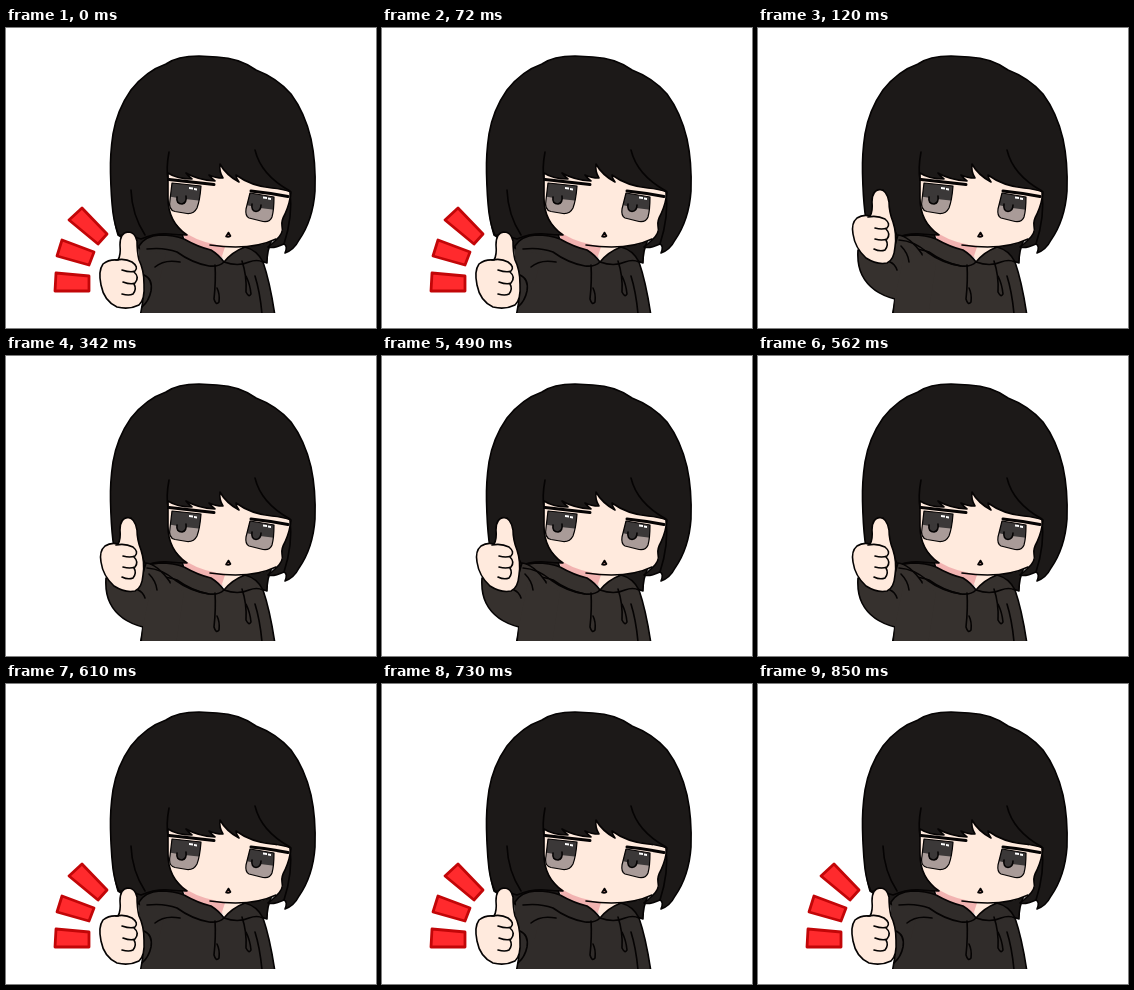
An HTML page for the animation above (970 ms loop, 370 by 300 pixels).

```html
<!DOCTYPE html>
<html lang="en">
<head>
<meta charset="utf-8">
<title>Thumbs up</title>
<style>
  html, body { margin: 0; width: 100%; height: 100%; overflow: hidden; background: #fff; }
  svg { display: block; width: 100vw; height: 100vh; }
  .ink { fill: none; stroke: #050303; stroke-width: 1.6; stroke-linecap: round; stroke-linejoin: round; }
  .hair { fill: #1c1918; }
  .skin { fill: #ffeadd; }
  .blush { fill: #f2b3b1; }
  .cloth { fill: var(--cloth); }
  .iris { fill: #a99b98; }
  .shade { fill: #3b3838; }
  .lid { stroke-width: 3; }
  .marks path { fill: #ff2a2d; stroke: #c20608; stroke-width: 2.8; stroke-linejoin: round; }

  svg { --cloth: #302c2a; animation: cloth 970ms step-end infinite; }
  .push { animation: push 970ms step-end infinite; }
  .raise { animation: raise 970ms step-end infinite; }
  /* raised from 120 ms to 610 ms */
  @keyframes cloth { 0%, 62.887% { --cloth: #302c2a; } 12.371% { --cloth: #36312e; } }
  @keyframes push { 0%, 62.887% { visibility: visible; } 12.371% { visibility: hidden; } }
  @keyframes raise { 0%, 62.887% { visibility: hidden; } 12.371% { visibility: visible; } }
</style>
</head>
<body>
<svg viewBox="0 0 370 300" preserveAspectRatio="none">
  <defs>
    <clipPath id="left-iris"><path id="left-eye" d="M166 155 L195 158 Q194 172 191 180 Q188 186 181 185.500 L169 183.500 Q162 182 164 172Z"/></clipPath>
    <clipPath id="right-iris"><path id="right-eye" d="M244 165 L268 169 Q268 182 266 189 Q264 194.500 257 193.500 L243 190 Q239 188 240 181Z"/></clipPath>
    <clipPath id="crop"><path d="M0 0H370V285H0Z"/></clipPath>
  </defs>

  <g clip-path="url(#crop)">
    <!-- back hair -->
    <path class="ink hair" d="M107 150 Q106 188 112 207 L136 222 L178 214 L165 150Z"/>
    <path class="ink hair" d="M236 218 L266 212 Q261 222 261 235 Q252 232 244 229Z"/>

    <!-- neck -->
    <path class="blush" d="M174 198 L226 214 L217 230 L206 223 L180 214Z"/>
    <path class="skin" d="M220 216 L240 216 L219 234 L216 228Z"/>

    <!-- hoodie -->
    <path class="ink cloth" d="M133 218 Q139 208 154 207 Q168 207 178 211 Q192 219 205 222 Q213 227 218 234 Q226 224 239 219 Q251 222 257 234 Q264 254 269 288 H134 Q139 270 136 246Z"/>
    <path class="ink" d="M141 221 Q158 219 171 224 Q186 235 203 238 Q213 239 218 234 M218 234 Q232 239 243 234 Q251 231 257 234"/>
    <path class="ink" d="M249 248 Q254 264 256 286"/>
    <path class="ink" d="M209 237 Q210 252 208 271 Q210 278 213 274 Q214 266 211 260 M236 233 Q241 248 240 264 Q243 270 245 266 Q244 256 240 248"/>

    <!-- face -->
    <path class="skin" d="M162 120 L162 180 Q167 197 181 206 Q198 216 220 218 Q246 221 266 213 L280 204 L287 160 L230 115Z"/>
    <path class="ink" d="M204 217 Q245 223 270 211"/>

    <!-- front hair with the fringe -->
    <path class="ink hair" d="M193 28 Q171 28 160 36 Q140 43 125 62 Q111 82 107 106 Q104 126 104.500 145 Q105 168 107 185 Q109 199 113 207 Q123 207 135 211 Q149 205 163 206 Q173 207 181 207
      Q162 194 162 170 L162 145 Q171 151 186 151 Q182 148 180 145 Q192 152 209 153 Q205 150 203 147 Q209 150 217 150 Q213 144 214 136
      Q220 147 233 154 Q230 150 230 147 Q245 158 266 160 Q277 161 285 164 Q284 175 279 186 Q275 193 276 198 Q278 205 270 212 Q266 216 262 219
      Q267 221 278 216 Q282 218 279 225 Q288 222 293 212
      Q307 192 309 163 Q310 134 305 111 Q299 85 285 66 Q271 50 250 42 Q234 30 211 29Z"/>
    <path class="ink" d="M125 162 Q126 187 139 207 M163 124 Q160 140 162 152 M249 122 Q255 147 284 163 M284 164 Q287 188 278 216"/>

    <!-- eyes -->
    <use href="#left-eye" class="iris"/>
    <g clip-path="url(#left-iris)">
      <path class="shade" d="M160 150H200V173Q179 172 160 168Z"/>
      <path class="ink shade" d="M171 169 Q170 176 176 176 Q181 175 180 168" style="fill:#3b3838"/>
    </g>
    <use href="#left-eye" class="ink" style="stroke-width:1.2"/>
    <path class="ink lid" d="M163 151.500 Q185 154 208 156.500"/>
    <path d="M183 159l4 .5v2l-4-.5ZM188 160l3 .5v2l-3-.5Z" fill="#fff"/>

    <use href="#right-eye" class="iris"/>
    <g clip-path="url(#right-iris)">
      <path class="shade" d="M236 160H272V182Q254 181 236 176Z"/>
      <path class="ink" d="M246 176 Q245 183 250 183.500 Q255 183 255 177" style="fill:#3b3838"/>
    </g>
    <use href="#right-eye" class="ink" style="stroke-width:1.2"/>
    <path class="ink lid" d="M245 163 Q264 165 282 168.500"/>
    <path d="M257 168.500l4 .5v2l-4-.5ZM262 169.500l3 .5v2l-3-.5Z" fill="#fff"/>

    <path class="ink" d="M222.500 204.500 L220 208.500 Q222.500 209.500 224.500 208Z" style="fill:#b98080"/>

    <!-- fist pushed forward -->
    <g class="push">
      <path class="cloth" d="M132 221 L160 226 L153 254 L138 270Z"/>
      <path class="ink" d="M174 234 Q158 231 149 239 M138 247 Q147 251 145 263 Q143 273 136 279"/>
      <path class="ink skin" d="M112 232 Q115 227 114 217 Q114 204.500 122 204 Q129 204 131 213 Q131 224 133 232 Q138 242 138 256 Q139 272 133 277 Q123 282 111 279 Q98 273 95 257 Q92 243 97 236 Q103 231 112 232Z"/>
      <path class="ink" d="M110 232 Q119 230 126 234 Q133 239 129 243 Q125 245 116 242 M128 244 Q134 249 129 255 Q125 257 117 254 M128 256 Q131 261 127 266 Q123 268 116 266"/>
      <g class="marks">
        <path d="M76 180 L101 206 L92 216 L63 192Z"/>
        <path d="M56 212 L88 224 L83 237 L51 228Z"/>
        <path d="M50 245 L83 248 V263 L49 263Z"/>
      </g>
    </g>

    <!-- fist raised -->
    <g class="raise">
      <path class="ink cloth" d="M100 222 Q99 237 104 247 Q113 265 137 271 L135 288 H160 L164 226 Q151 208 140 207 L134 227Z"/>
      <path class="cloth" d="M137 270 L136 288 H170 L178 236 Q160 223 147 222Z"/>
      <path class="ink" d="M141 212 Q156 213 169 224 Q184 235 203 238 M139 242 Q137 236 132 234 M143 218 Q150 225 151 234"/>
      <path class="ink skin" d="M112 188 Q115 183 114 174 Q114 162 122 161.500 Q129 162 131 174 Q131 184 135 194 Q139 206 137 219 Q136 232 129 235 Q119 237 108 230 Q97 220 95 206 Q93 195 99 190 Q105 186 112 188Z"/>
      <path class="ink" d="M110 189 Q119 187 127 191 Q133 196 129 200 Q124 202 117 200 M128 201 Q133 206 129 211 Q124 213 117 211 M128 212 Q131 217 127 222 Q122 224 116 221"/>
    </g>
  </g>
</svg>
</body>
</html>
```
